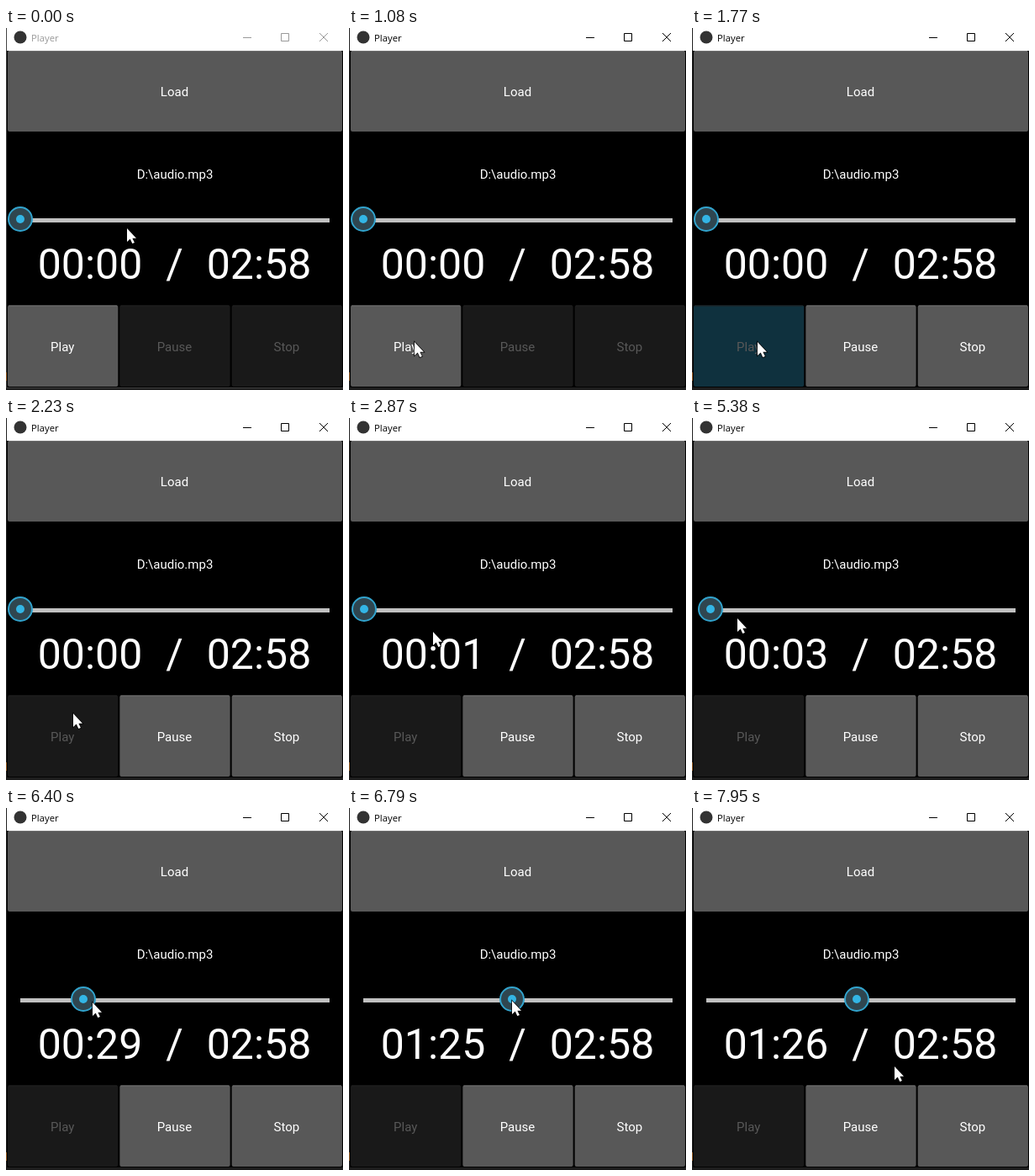
Write an HTML page that moves like this. It is 401x430 px and loops after 8000 ms.

```html
<!DOCTYPE html>
<html lang="en">
<head>
<meta charset="utf-8">
<title>Player</title>
<style>
  html, body { margin: 0; width: 100%; height: 100%; overflow: hidden; background: #000; }
  svg { display: block; }
  text { font: 15px Roboto, sans-serif; fill: #fff; text-anchor: middle; }
  #title { font: 11.3px "Open Sans", sans-serif; text-anchor: start; }
  .time text { font-size: 50px; }
  .button rect { fill: #585858; }
  .button path { stroke: #707070; }
  .disabled rect { fill: #191919; }
  .disabled path { stroke: #222; }
  .disabled text { fill: #585858; }
  .pressed rect { fill: #0f313e; }
  #chrome { fill: #000; stroke: #000; }
  #chrome text { fill: inherit; stroke: none; }
  #chrome.inactive { fill: #999; stroke: #999; }
  #border { fill: none; stroke: #222; }
  .inactive + #border { stroke: #444; }
</style>
</head>
<body>
<svg width="401" height="430" viewBox="0 0 401 430">
  <rect width="401" height="430"/>
  <rect x="1" width="400" height="27" fill="#fff"/>
  <path d="M0 429H401" stroke="#1c1c1c" stroke-width="2"/>
  <circle cx="17" cy="11" r="7.5" fill="#333"/>
  <g id="chrome">
    <text id="title" x="30" y="16">Player</text>
    <path d="M282 11.5H292M327.5 6.5H336.5V15.5H327.5ZM373 6L383 16M383 6L373 16" fill="none"/>
  </g>
  <path id="border" d="M.5 0V427.5H401"/>
  <path d="M.5 409V419" stroke="#9a6028"/>
  <g id="buttons"></g>
  <text x="201" y="179">D:\audio.mp3</text>
  <path d="M17 228.5H385" stroke="#c0c0c0" stroke-width="5"/>
  <g id="knob">
    <circle r="14" fill="#2f4650" stroke="#32a4ce" stroke-width="2"/>
    <circle r="5" fill="#33b5e5"/>
  </g>
  <g class="time">
    <text id="elapsed" x="100" y="298"></text>
    <text x="200.5" y="298">/</text>
    <text id="total" x="301" y="298"></text>
  </g>
  <path id="cursor" d="M0 0V16L3.7 12.6L6.3 18L8.9 17L6.4 11.7H11Z"
    fill="#fff" stroke="#000" stroke-width="1.4" paint-order="stroke"/>
</svg>
<script>
const LOOP = 8000, FOCUS = 1080, PRESS = 1770, RELEASE = 2230, GRAB = 6200, DROP = 6790;
const TICK = 1025, DURATION = 178;
const TRACK_START = 17, TRACK_LENGTH = 368;
const KNOB_LAG = 27, LABEL_LAG = 64;

// Mouse path: [ms, x, y]
const path = [
  [100, 144, 238], [270, 158, 342], [540, 95, 396], [1080, 78, 373], [2165, 78, 373],
  [2500, 86, 260], [2870, 100, 254], [3820, 100, 249], [4500, 100, 249], [4840, 84, 246],
  [5380, 54, 238], [5890, 22, 230], [GRAB, 22, 230], [6400, 103, 231], [6750, 194, 229],
  [7560, 187, 229], [7950, 241, 307]
];

const $ = id => document.getElementById(id);
const pad = n => String(n).padStart(2, "0");
const clock = s => pad(Math.floor(s / 60)) + ":" + pad(Math.floor(s % 60));
const toX = seconds => TRACK_START + TRACK_LENGTH * seconds / DURATION;
const toSeconds = x => (x - TRACK_START) / TRACK_LENGTH * DURATION;
const ticksSince = (start, t) => Math.max(0, Math.floor((t - start) / TICK));
const move = (id, x, y) => $(id).setAttribute("transform", `translate(${x} ${y})`);

function mouseAt(t) {
  const next = path.findIndex(point => point[0] > t);
  if (next < 1) return path.at(next).slice(1);
  const [[t0, x0, y0], [t1, x1, y1]] = path.slice(next - 1, next + 1);
  const u = (t - t0) / (t1 - t0);
  return [Math.round(x0 + (x1 - x0) * u), Math.round(y0 + (y1 - y0) * u)];
}

// The knob trails the mouse while dragged; the label trails the knob.
function playbackAt(t) {
  if (t < GRAB) {
    const ticks = ticksSince(PRESS, t);
    return { position: Math.max(0, ticks - .5), shown: ticks };
  }
  if (t < DROP) {
    const dragged = lag => toSeconds(mouseAt(t - lag)[0]);
    return { position: dragged(KNOB_LAG), shown: dragged(LABEL_LAG) };
  }
  const position = toSeconds(mouseAt(DROP - KNOB_LAG)[0]) + ticksSince(DROP, t);
  return { position, shown: position };
}

function addButton(label, x, y, width, height) {
  $("buttons").insertAdjacentHTML("beforeend", `<g id="${label}" class="button">
    <rect x="${x}" y="${y}" width="${width}" height="${height}" rx="2"/>
    <path d="M${x + 1} ${y + .5}h${width - 2}"/>
    <text x="${x + width / 2 - .5}" y="${y + 54}">${label}</text></g>`);
}
addButton("Load", 2, 27, 398, 96);
["Play", "Pause", "Stop"].forEach((label, i) => addButton(label, 2 + i * 400 / 3, 329.5, 131.3, 96.5));
$("total").textContent = clock(DURATION);

function draw(now) {
  const t = now % LOOP;
  const playing = t >= PRESS;
  const { position, shown } = playbackAt(t);
  move("cursor", ...mouseAt(t));
  move("knob", Math.round(toX(position)), 227);
  $("elapsed").textContent = clock(shown);
  $("chrome").classList.toggle("inactive", t < FOCUS);
  $("Play").classList.toggle("disabled", playing);
  $("Play").classList.toggle("pressed", playing && t < RELEASE);
  for (const id of ["Pause", "Stop"]) $(id).classList.toggle("disabled", !playing);
  requestAnimationFrame(() => draw(performance.now()));
}
draw(0);
</script>
</body>
</html>
```
